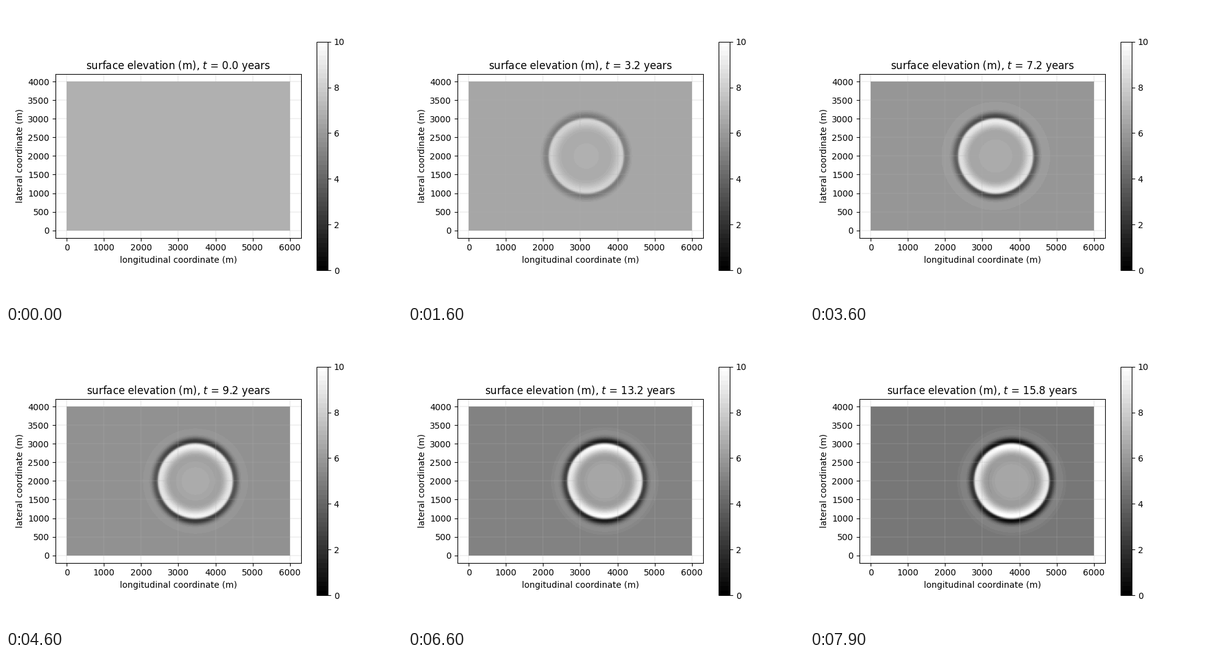
A matplotlib script for the animation above (8000 ms loop, 640 by 480 pixels).

```python
import numpy as np
import matplotlib.pyplot as plt
from matplotlib.animation import FuncAnimation

FRAMES, INTERVAL = 80, 100
YEARS_PER_FRAME = 0.2
LENGTH, WIDTH, RADIUS = 6000, 4000, 1000
SPEED = 50  # drift of the disc, m per year

x, y = np.meshgrid(np.linspace(0, LENGTH, 601), np.linspace(0, WIDTH, 401))


def bump(s, center, width):
    return np.exp(-0.5 * ((s - center) / width) ** 2)


def elevation(t):
    dx, dy = x - (3000 + SPEED * t), y - WIDTH / 2
    r = np.hypot(dx, dy)
    s = r / RADIUS
    side = (dx / np.maximum(r, 1)) ** 2
    growth = 1 - np.exp(-t / 7)

    plain = 6.98 - 0.143 * t
    core = 6.98 - 0.48 * growth
    inside = 1 / (1 + np.exp(np.clip((s - 1.01) / 0.015, -50, 50)))

    rim = 4.1 * growth * (1 - 0.3 * growth * side) * bump(s, 0.96, 0.13)
    dip = 0.9 * growth**2 * bump(s, 0.68, 0.13)
    moat = 5 * growth * (1 - 0.45 * growth * side)
    moat = moat * bump(s, 1.06, 0.1 - 0.03 * growth)
    swell = 0.6 * growth**2 * bump(s, 1.28, 0.1)

    z = inside * (core + rim - dip) + (1 - inside) * (plain - moat + swell)
    return np.clip(z, 0, 10)


fig, ax = plt.subplots(figsize=(6.4, 4.8), dpi=100)
field = ax.imshow(elevation(0), cmap=plt.get_cmap("gray", 50), vmin=0, vmax=10,
                  extent=(0, LENGTH, 0, WIDTH), origin="lower",
                  interpolation="nearest")
ax.set(xlim=(-300, 6300), ylim=(-200, 4200),
       xticks=range(0, 6001, 1000), yticks=range(0, 4001, 500),
       xlabel="longitudinal coordinate (m)", ylabel="lateral coordinate (m)")
ax.grid(linewidth=0.25)
fig.colorbar(field, ax=ax, ticks=range(0, 11, 2))
title = ax.set_title("")


def update(i):
    t = i * YEARS_PER_FRAME
    field.set_data(elevation(t))
    title.set_text(f"surface elevation (m), $t$ = {t:.1f} years")
    return field, title


anim = FuncAnimation(fig, update, frames=FRAMES, interval=INTERVAL,
                     repeat=True, repeat_delay=0)
plt.show()
```
